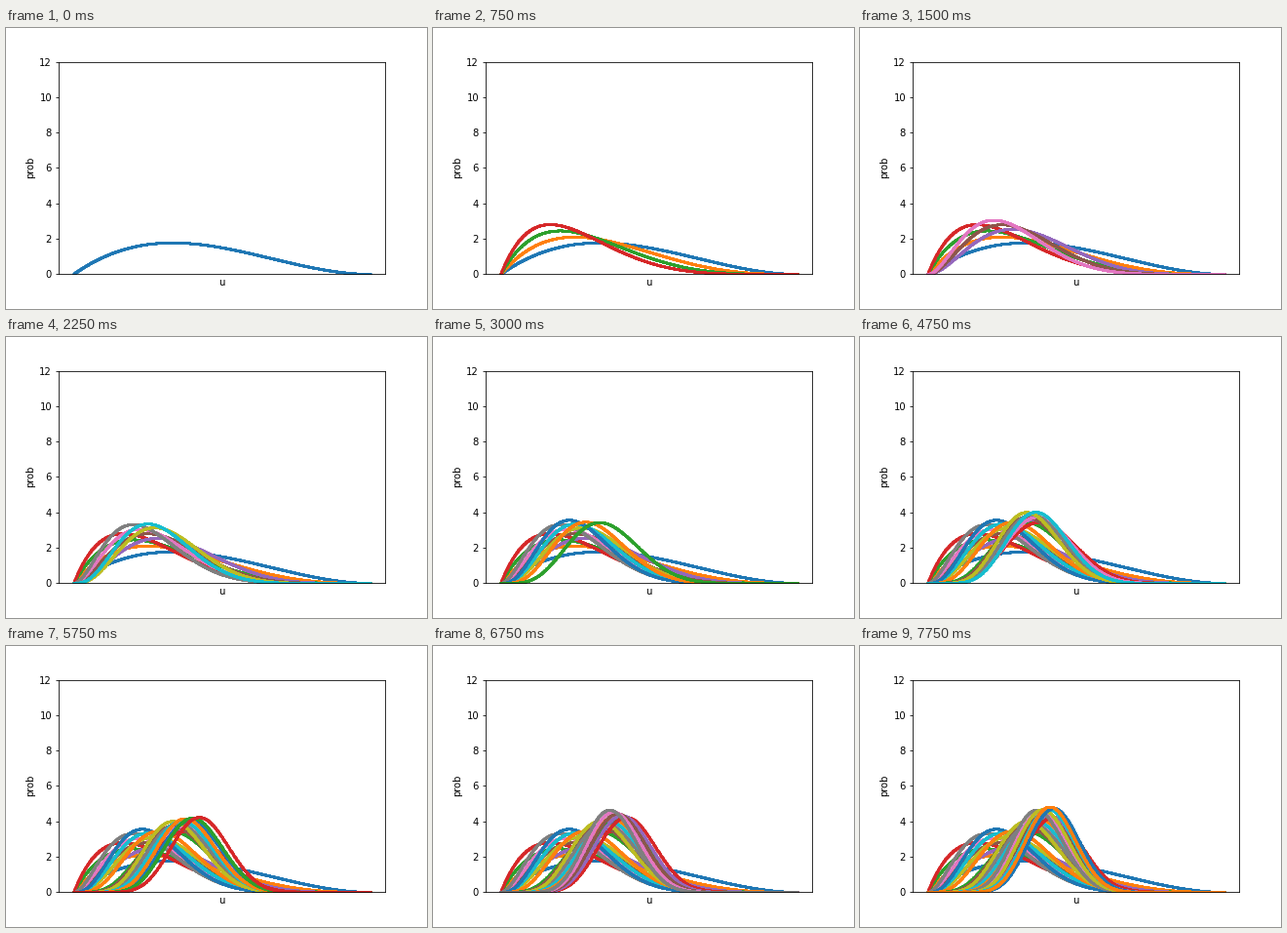
Write a matplotlib script that moves like this. It is 432 px wide and 288 px high and loops after 8000 ms.

```python
import math

import matplotlib.pyplot as plt
import numpy as np
from matplotlib.animation import FuncAnimation

# Each flip updates a Beta(2, 3) prior: 1 raises a, 0 raises b.
FLIPS = "0001000100111001001101100001110"


def beta_pdf(u, a, b):
    scale = math.gamma(a + b) / (math.gamma(a) * math.gamma(b))
    return scale * u ** (a - 1) * (1 - u) ** (b - 1)


def posteriors(a=2, b=3):
    yield a, b
    for flip in FLIPS:
        if flip == "1":
            a += 1
        else:
            b += 1
        yield a, b


fig, ax = plt.subplots(figsize=(6, 4), dpi=72)
fig.subplots_adjust(left=0.125, right=0.9, bottom=0.125, top=0.88)
u = np.linspace(0, 1, 1000)
curves = [ax.plot(u, beta_pdf(u, a, b), "o", ms=2)[0] for a, b in posteriors()]
ax.set_ylim(0, 12)
ax.set_xticks([])
ax.set_xlabel("u")
ax.set_ylabel("prob")


def update(step):
    for i, curve in enumerate(curves):
        curve.set_visible(i <= step)
    return curves


anim = FuncAnimation(fig, update, frames=len(curves), interval=250,
                     repeat=True, repeat_delay=0)
plt.show()
```
